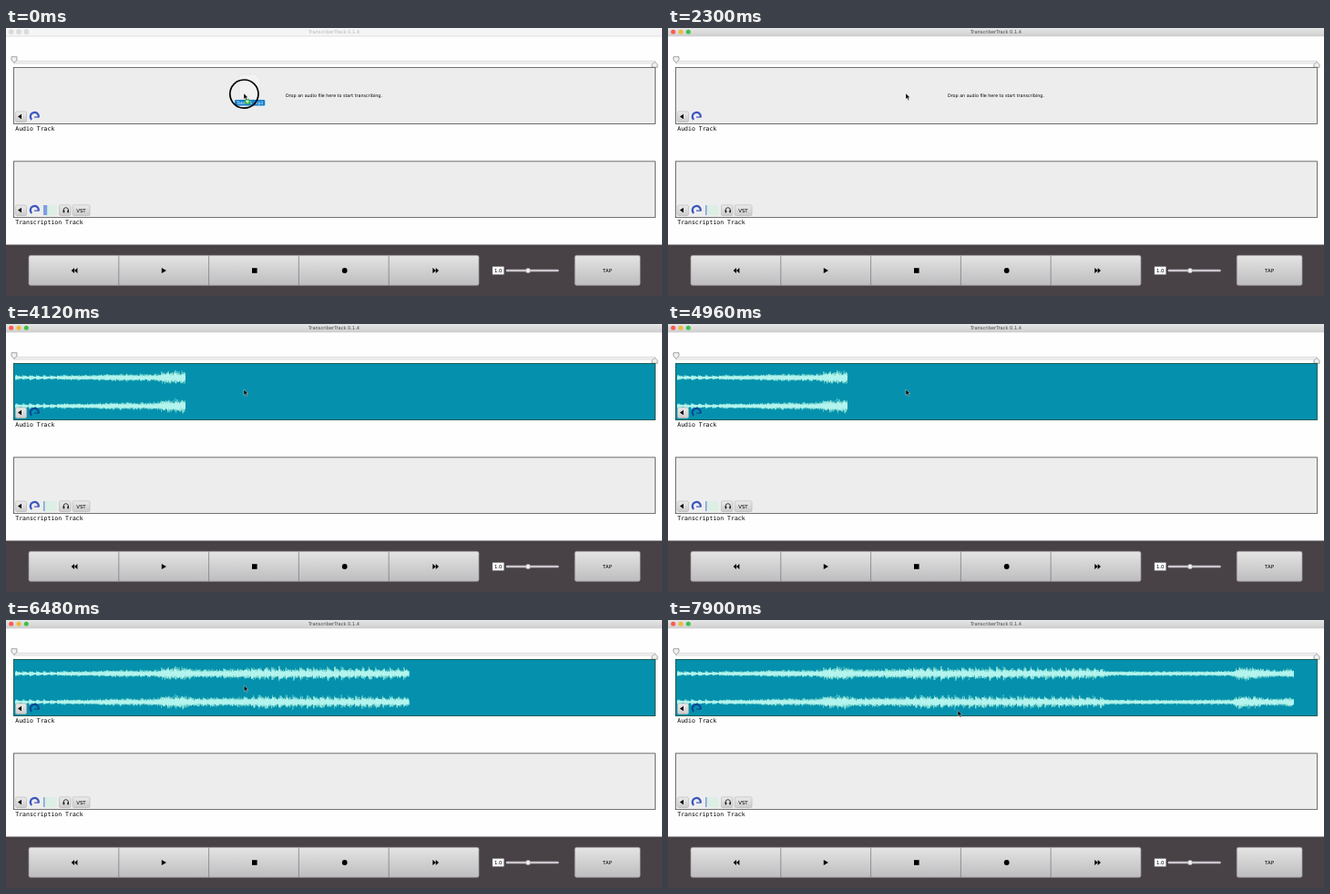
These frames come from a looping animation (720 px wide and 295 px high, 8 s). An HTML page:

```html
<!DOCTYPE html>
<html lang="en">
<head>
<meta charset="utf-8">
<title>Audio transcription</title>
<style>
html, body { margin: 0; width: 100%; height: 100%; overflow: hidden; background: #fefefe; }
svg { display: block; width: 100%; height: 100%; }
text { font-family: "DejaVu Sans", sans-serif; font-size: 4.8px; fill: #000; }
.label { font-family: "DejaVu Sans Mono", monospace; font-size: 6.5px; }
.mid { text-anchor: middle; }
.key { font-size: 5.4px; }
</style>
</head>
<body>
<svg viewBox="0 0 720 295">
  <defs>
    <linearGradient id="face" x2="0" y2="1">
      <stop offset="0" stop-color="#e4e4e4"/><stop offset="1" stop-color="#bdbdbf"/>
    </linearGradient>
    <linearGradient id="small" x2="0" y2="1">
      <stop offset="0" stop-color="#ebebeb"/><stop offset="1" stop-color="#cbcbcb"/>
    </linearGradient>
    <linearGradient id="bar" x2="0" y2="1">
      <stop offset="0" stop-color="#e6e6e6"/><stop offset="1" stop-color="#cfcfcf"/>
    </linearGradient>
    <clipPath id="loaded"><rect id="loadedBox" x="9" y="44" width="0" height="61"/></clipPath>
    <g id="speaker">
      <rect x="10.5" y=".5" width="12" height="11.5" rx="1.5" fill="url(#small)" stroke="#b4b4b4" stroke-width=".6"/>
      <path d="M13 6L17 3.2V8.8Z" fill="#000"/>
    </g>
    <g id="knob" fill="none">
      <path d="M28.2 9.4A4.6 4.6 0 1 1 35.9 6.6" stroke="currentColor" stroke-width="2.3"/>
      <path d="M31 6.6H36.3" stroke="currentColor" stroke-width="1.2"/>
    </g>
  </defs>

  <rect width="720" height="295" fill="#fefefe"/>
  <rect id="titleBar" width="720" height="9" fill="url(#bar)"/>
  <path d="M0 9H720" stroke="#c2c2c2" stroke-width=".5"/>
  <g id="lights"></g>
  <text id="title" class="mid" x="360" y="6" style="font-size:5.1px">TranscriberTrack 0.1.4</text>

  <rect x="8.5" y="36.2" width="704" height="2.8" fill="#f1f1f3" stroke="#d2d2d6" stroke-width=".7"/>
  <g fill="#f1f1f1" stroke="#8f8f8f" stroke-width=".8">
    <path d="M6 31.7H12V35L9 38.3L6 35Z"/>
    <path d="M709 43.3H715V40.3L712 37.3L709 40.3Z"/>
  </g>

  <rect id="track" x="8.5" y="43.5" width="704" height="62" stroke-width=".9"/>
  <text id="hint" class="mid" x="360" y="76.2">Drop an audio file here to start transcribing.</text>
  <g clip-path="url(#loaded)">
    <path id="peaks" fill="#83ddd2"/>
    <path id="body" fill="#b4f4ee"/>
  </g>
  <use href="#speaker" y="91.5"/>
  <use id="gain" href="#knob" y="91.5"/>
  <text class="label" x="10.3" y="112.7">Audio Track</text>

  <rect x="8.5" y="146.8" width="704" height="61.8" fill="#ededed" stroke="#606060" stroke-width=".9"/>
  <use href="#speaker" y="194.5"/>
  <use href="#knob" y="194.5" color="#3d56c0"/>
  <rect x="41" y="195" width="14.5" height="11" fill="#dcefe4"/>
  <rect id="level" x="41" y="195" width="1.5" height="11" fill="#7d9fe0"/>
  <g fill="url(#small)" stroke="#b4b4b4" stroke-width=".6">
    <rect x="58.5" y="194.8" width="12.5" height="11.8" rx="1.5"/>
    <rect x="73.3" y="194.8" width="18.7" height="11.8" rx="1.5"/>
  </g>
  <path d="M63.1 202.4V200.4A2.7 2.7 0 0 1 68.5 200.4V202.4" fill="none" stroke="#111" stroke-width=".8"/>
  <path d="M63.5 200.6V203.2M68.1 200.6V203.2" stroke="#111" stroke-width="1.5"/>
  <text class="mid key" x="82.4" y="202.6">VST</text>
  <text class="label" x="10.3" y="215.7">Transcription Track</text>

  <rect y="238.5" width="720" height="56.5" fill="#484247"/>
  <g fill="url(#face)" stroke="#9c9298" stroke-width=".7">
    <rect x="25" y="250.3" width="494" height="33" rx="2"/>
    <rect x="624.3" y="250.3" width="71.7" height="33" rx="2"/>
    <path d="M123.8 250.5V283M222.6 250.5V283M321.4 250.5V283M420.2 250.5V283" stroke="#77727a"/>
  </g>
  <g fill="#000">
    <path d="M75 264V270L71.7 267ZM78.4 264V270L75 267Z"/>
    <path d="M170.8 264V270L176 267Z"/>
    <rect x="270" y="264.2" width="5.6" height="5.6"/>
    <circle cx="371.7" cy="267" r="2.9"/>
    <path d="M468.3 264V270L471.7 267ZM471.7 264V270L475 267Z"/>
  </g>
  <rect x="534" y="262.8" width="12.5" height="8.4" fill="#fefefe" stroke="#a5a5a5" stroke-width=".5"/>
  <text class="mid key" x="540.2" y="268.9">1.0</text>
  <path d="M550 267H605.5" stroke="#cbc5cd" stroke-width="2.6" stroke-linecap="round"/>
  <circle cx="573" cy="267" r="2.6" fill="#f0f0f0" stroke="#a0a0a0" stroke-width=".6"/>
  <text class="mid key" x="660" y="268.8">TAP</text>

  <g id="drag">
    <path d="M256 51H274L279 56V78H256Z" fill="#f5f5f5" stroke="#dedede" stroke-width=".6" opacity=".7"/>
    <rect x="251" y="79" width="33.3" height="6.6" rx="1.4" fill="#1580cc"/>
    <text class="mid" x="267.6" y="84" style="font-size:4.6px;fill:#eefaff">Take 01.mp3</text>
    <circle cx="265" cy="81" r="3.1" fill="#2fb83a"/>
    <path d="M263.2 81H266.8M265 79.2V82.8" stroke="#fff" stroke-width=".9"/>
    <circle cx="261.4" cy="72.6" r="15.6" fill="none" stroke="#000" stroke-width="1.7"/>
  </g>
  <path id="cursor" d="M0 0V6.3L1.5 5L2.6 7.5L3.7 7L2.6 4.6H4.6Z" fill="#000" stroke="#f4f4f4" stroke-width=".4"/>
</svg>
<script>
const LOOP = 8000;
const $ = id => document.getElementById(id);
const set = (id, attrs) => { for (const k in attrs) $(id).setAttribute(k, attrs[k]); };
const clamp = v => Math.max(0, Math.min(1, v));
const ease = v => v * v * (3 - 2 * v);

$('lights').innerHTML = [5.7, 14, 22.3].map(x => `<circle cx="${x}" cy="4.2" r="2.5" stroke-width=".5"/>`).join('');
const lamps = [...$('lights').children];

// Loudness along the track: x, half height
const LOUD = [[10, 3.5], [40, 3], [95, 3], [110, 4.5], [165, 4.5], [172, 8], [196, 8.5], [204, 5.5],
  [260, 6], [268, 9], [325, 8.5], [440, 7.5], [476, 7], [484, 3], [540, 2.6], [620, 3.2],
  [624, 8.5], [645, 8], [655, 5.5], [672, 4.2], [676, 6], [686, 6]];

function loudness(x) {
  const i = Math.max(1, LOUD.findIndex(p => p[0] >= x));
  const [x0, a] = LOUD[i - 1], [x1, b] = LOUD[i];
  return a + (b - a) * (x - x0) / (x1 - x0);
}

function random(seed) {
  return () => (seed = seed * 16807 % 2147483647) / 2147483647;
}

function wave(mid, share, seed) {
  const rnd = random(seed);
  let d = '';
  for (let x = 10; x < 686.4; x += 0.7) {
    const depth = x < 60 ? 0.8 : x > 265 && x < 480 ? 0.55 : 0.3;
    const beat = 1 - depth * ((x - 10) % 7.6) / 7.6;
    const h = loudness(Math.min(x, 686)) * beat * share;
    const up = 0.4 + h * (0.35 + 0.65 * rnd()), down = 0.4 + h * (0.35 + 0.65 * rnd());
    d += `M${x.toFixed(1)} ${(mid - up).toFixed(1)}h.7v${(up + down).toFixed(1)}h-.7z`;
  }
  return d;
}
set('peaks', { d: wave(59, 1, 71) + wave(90.3, 1, 313) });
set('body', { d: wave(59, 0.68, 929) + wave(90.3, 0.68, 557) });

function draw(t) {
  const active = t >= 330, teal = t >= 3100;
  const lampColors = active ? ['#fb5a52', '#f3b735', '#3dc148'] : Array(3).fill('#dcdcdc');
  lamps.forEach((lamp, i) => {
    lamp.setAttribute('fill', lampColors[i]);
    lamp.setAttribute('stroke', active ? 'none' : '#c8c8c8');
  });
  set('titleBar', { fill: active ? 'url(#bar)' : '#f5f5f5' });
  $('title').style.fill = active ? '#454545' : '#b4b4b4';

  set('drag', { opacity: 1 - clamp((t - 30) / 200) });
  set('track', { fill: teal ? '#0591ad' : '#ededed', stroke: teal ? '#125248' : '#606060' });
  set('hint', { visibility: teal ? 'hidden' : 'visible' });
  set('gain', { color: teal ? '#0c4a96' : '#3d56c0' });

  const end = t < 3940 ? 9 : t < 5620 ? 197 : t < 7300 ? 442.5 : 687;
  set('loadedBox', { width: end - 9 });
  set('level', { width: t < 330 || t >= 6900 && t < 7300 ? 4.2 : 1.5 });

  const go = ease(clamp((t - 6460) / 560)), back = ease(clamp((t - 7300) / 500));
  const x = 261 + 63.6 * go - 6.5 * back, y = 72 + 24 * go + 3.6 * back;
  set('cursor', { transform: `translate(${x.toFixed(2)} ${y.toFixed(2)})` });
}

function tick() {
  draw(performance.now() % LOOP);
  requestAnimationFrame(tick);
}
tick();
</script>
</body>
</html>
```
